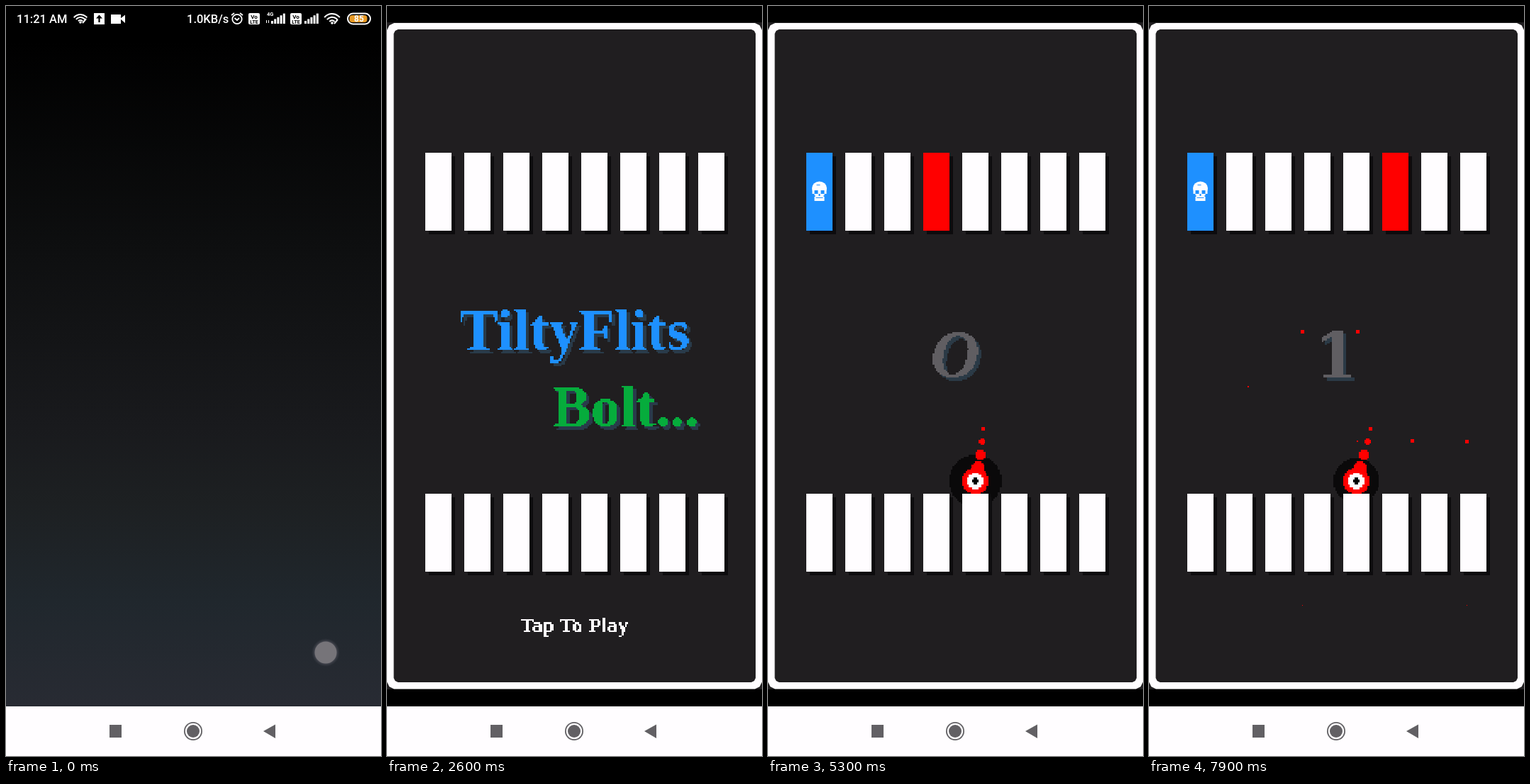
An HTML page with a canvas that plays this animation: 529 by 1058 pixels, repeating every 8 s.

```html
<!DOCTYPE html>
<html lang="en">
<head>
<meta charset="utf-8">
<title>TiltyFlits Bolt</title>
<style>
  html, body { margin: 0; width: 100%; height: 100%; overflow: hidden; background: #000; }
  canvas { display: block; width: 100%; height: 100%; }
</style>
</head>
<body>
<canvas id="stage" width="529" height="1058"></canvas>
<script>
const W = 529, H = 1058, LOOP = 8000, STEP = 100, PX = 2.3;
const RED = '#ff0000', BLUE = '#1e90ff', WHITE = '#fffdff', PANEL = '#201e20';
const ctx = document.getElementById('stage').getContext('2d');
const SERIF = '"Liberation Serif", serif';

function rect(x, y, w, h, color) {
  ctx.fillStyle = color;
  ctx.fillRect(x, y, w, h);
}
function circle(x, y, r, color) {
  ctx.fillStyle = color;
  ctx.beginPath();
  ctx.arc(x, y, r, 0, Math.PI * 2);
  ctx.fill();
}
function poly(points, color) {
  ctx.fillStyle = color;
  ctx.beginPath();
  points.forEach(([x, y]) => ctx.lineTo(x, y));
  ctx.fill();
}
function text(str, x, y, font, color, align = 'left') {
  ctx.font = font;
  ctx.fillStyle = color;
  ctx.textAlign = align;
  ctx.fillText(str, x, y);
}
// Disc built from rows of square pixels
function disc(x, y, r, color) {
  const n = Math.round(r / PX);
  ctx.fillStyle = color;
  for (let row = -n; row < n; row++) {
    const half = Math.round(Math.sqrt(n * n - (row + .5) ** 2)) * PX;
    const top = Math.round(y + row * PX);
    ctx.fillRect(Math.round(x - half), top, Math.round(half * 2), Math.round(y + (row + 1) * PX) - top);
  }
}

// Text rendered on a coarse grid with hard edges
function textLayer(str, x, y, font, color, align) {
  const layer = document.createElement('canvas');
  layer.width = W / PX;
  layer.height = H / PX;
  const c = layer.getContext('2d');
  c.scale(1 / PX, 1 / PX);
  c.font = font;
  c.fillStyle = color;
  c.textAlign = align;
  c.fillText(str, x, y);
  const img = c.getImageData(0, 0, layer.width, layer.height);
  for (let i = 3; i < img.data.length; i += 4) img.data[i] = img.data[i] > 115 ? 255 : 0;
  c.putImageData(img, 0, 0);
  return layer;
}
function pixelText(str, x, y, font, color, align, shadow) {
  const layers = [textLayer(str, x, y, font, color, align)];
  if (shadow) layers.unshift(textLayer(str, x + 4.6, y + 4.6, font, shadow, align));
  return () => {
    ctx.imageSmoothingEnabled = false;
    layers.forEach(l => ctx.drawImage(l, 0, 0, l.width * PX, l.height * PX));
  };
}
const titleTop = pixelText('TiltyFlits', 101, 486, `bold 83px ${SERIF}`, BLUE, 'left', '#293b4a');
const titleEnd = pixelText('Bolt...', 233, 594, `bold 82px ${SERIF}`, '#06ac3c', 'left', '#293b4a');
const prompt = pixelText('Tap To Play', 264, 884, `bold 30px ${SERIF}`, WHITE, 'center');
const scores = [
  pixelText('O', 264, 524, `italic bold 96px ${SERIF}`, '#605e62', 'center', '#2b3a46'),
  pixelText('1', 264, 524, 'bold 88px "DejaVu Serif", serif', '#605e62', 'center', '#2b3a46')
];

function drawNav() {
  const gray = '#626064';
  rect(0, 988, W, 70, WHITE);
  rect(146, 1014, 17, 18, gray);
  circle(264, 1023, 13, gray);
  circle(264, 1023, 11.2, WHITE);
  circle(264, 1023, 9, gray);
  poly([[363, 1023], [380, 1013.5], [380, 1033]], gray);
}

function wifi(x, y, size) {
  ctx.strokeStyle = '#fff';
  ctx.lineWidth = 2;
  for (let i = 1; i <= 3; i++) {
    ctx.beginPath();
    ctx.arc(x, y, size * i / 3, -Math.PI * .78, -Math.PI * .22);
    ctx.stroke();
  }
  circle(x, y - 1, 1.8, '#fff');
  ctx.beginPath();
  ctx.moveTo(x + 3, y);
  ctx.lineTo(x + 8, y - 6);
  ctx.stroke();
}
function volte(x) {
  ctx.fillStyle = '#fff';
  ctx.beginPath();
  ctx.roundRect(x, 10, 16, 16, 2);
  ctx.fill();
  text('Vo', x + 8, 17.5, 'bold 8px Roboto, sans-serif', '#000', 'center');
  text('LTE', x + 8, 24.5, 'bold 7px Roboto, sans-serif', '#000', 'center');
}
function signal(x) {
  for (let i = 0; i < 5; i++) rect(x + i * 4.2, 21 - i * 2.6, 3, 4 + i * 2.6, '#fff');
}
function drawStatus() {
  const font = '500 16.5px Roboto, sans-serif';
  text('11:21 AM', 15, 24, font, '#fff');
  wifi(105, 24, 12);
  rect(124, 10, 15, 16, '#fff');
  poly([[131.5, 12.5], [136, 17.5], [127, 17.5]], '#000');
  rect(130.4, 16, 2.2, 7, '#000');
  rect(148, 12, 14, 13, '#fff');
  poly([[161, 18], [168, 12.5], [168, 24]], '#fff');
  text('1.0KB/s', 255, 24, font, '#fff');
  ctx.strokeStyle = '#fff';
  ctx.lineWidth = 1.8;
  ctx.beginPath();
  ctx.arc(326, 18.5, 6.7, 0, 7);
  ctx.moveTo(322.5, 17);
  ctx.lineTo(326, 20);
  ctx.lineTo(329, 17);
  ctx.moveTo(318, 13);
  ctx.lineTo(322, 10);
  ctx.moveTo(330, 10);
  ctx.lineTo(334, 13);
  ctx.stroke();
  volte(342);
  text('4G', 368, 14, 'bold 7.5px Roboto, sans-serif', '#fff');
  rect(367, 20, 1, 4, '#fff');
  rect(370, 20, 1, 4, '#fff');
  signal(374);
  volte(401);
  signal(421);
  wifi(460, 25, 14);
  ctx.fillStyle = '#e89a25';
  ctx.strokeStyle = '#fff';
  ctx.beginPath();
  ctx.roundRect(482, 10.5, 32, 15, 7.5);
  ctx.stroke();
  ctx.beginPath();
  ctx.roundRect(484.5, 13, 25, 10, 4);
  ctx.fill();
  text('85', 498, 22.3, 'bold 12px Roboto, sans-serif', '#fff', 'center');
}
function drawLaunch(alpha) {
  ctx.globalAlpha = alpha;
  const sky = ctx.createLinearGradient(0, 0, 0, 988);
  [[0, '#000'], [.05, '#000'], [.35, '#0e0f10'], [.6, '#191a1d'], [.71, '#1d2022'], [.85, '#20272d'], [1, '#282b33']]
    .forEach(([at, color]) => sky.addColorStop(at, color));
  rect(0, 0, W, 988, sky);
  drawStatus();
  const glow = ctx.createRadialGradient(451, 912, 14, 451, 912, 20);
  glow.addColorStop(0, '#55565f');
  glow.addColorStop(1, 'rgba(60,62,72,0)');
  circle(451, 912, 20, glow);
  circle(451, 912, 15.5, '#767479');
  ctx.globalAlpha = 1;
}

function drawPanel() {
  rect(0, 23, W, 941, PANEL);
  const cut = (l, t, r, b, n) => [
    [l + n, t], [r - n, t], [r - n / 3, t + n / 3], [r, t + n], [r, b - n], [r - n / 3, b - n / 3],
    [r - n, b], [l + n, b], [l + n / 3, b - n / 3], [l, b - n], [l, t + n], [l + n / 3, t + n / 3]
  ];
  poly(cut(0, 24, W, 963.5, 10), WHITE);
  poly(cut(9.5, 33, 520, 954, 6), PANEL);
}

const columnX = col => 72 + (col - 1) * 55.1;
const rowY = { top: 207, bottom: 688 };

function drawSkull(x, y) {
  ctx.fillStyle = WHITE;
  ctx.beginPath();
  ctx.ellipse(x, y - 4, 10.5, 9.5, 0, 0, 7);
  ctx.fill();
  rect(x - 10, y - 3, 20, 7, WHITE);
  rect(x - 7, y + 2, 14, 12, WHITE);
  rect(x - 7, y - 1, 5, 5, BLUE);
  rect(x + 2, y - 1, 5, 5, BLUE);
  rect(x - 1, y + 4, 2, 3, BLUE);
  rect(x - 5, y + 9, 10, 1, BLUE);
  rect(x - 4, y - 9, 5, 1, BLUE);
  rect(x - 8, y + 6, 2, 2, BLUE);
  rect(x + 6, y + 6, 2, 2, BLUE);
}
function drawTiles(special) {
  for (const row in rowY) {
    const y = rowY[row];
    for (let col = 1; col <= 8; col++) {
      const x = Math.round(columnX(col) - 18.5);
      rect(x + 5, y + 5, 37, 110, '#0c0b0d');
      const kind = special[row + col];
      rect(x, y, 37, 110, kind === 'red' ? RED : kind ? BLUE : WHITE);
      if (kind === 'skull') drawSkull(x + 18.5, y + 54);
    }
  }
}
function tilesAt(t) {
  const special = { top1: 'skull' };
  if (t >= 7900) special.top6 = 'red';
  else if (t >= 6200) special.bottom5 = 'red', special.bottom8 = 'skull';
  else if (t >= 5300) special.top4 = 'red';
  return special;
}

// Each hit: [time, column, sideways bend]; hits alternate bottom, top
const START = 4100, CROSSING = 300;
const hits = [
  [START, 5, 0], [4400, 8, 0], [4700, 4, 0], [5000, 4, 0], [5300, 5, 135], [5600, 4, 0], [5900, 3, 0],
  [6200, 3, 0], [6550, 4, 0], [6900, 2, 0], [7250, 4, 0], [7600, 6, 0], [7900, 5, 47]
];
const endY = i => i % 2 ? 338 : 670;

function ballAt(t) {
  let i = hits.findIndex(hit => hit[0] >= t);
  if (i < 0) i = hits.length - 1;
  const [time, col, bend] = hits[i];
  if (!i) return [columnX(col), endY(0)];
  const s = Math.min(1, Math.max(0, 1 - (time - t) / CROSSING));
  const from = columnX(hits[i - 1][1]);
  return [
    from + (columnX(col) - from) * s + bend * s * (1 - s),
    endY(i - 1) + (endY(i) - endY(i - 1)) * s
  ];
}
function drawBall(t) {
  [2, 4, 6, 9].forEach((r, i) => disc(...ballAt(t - (4 - i) * 1000 / 60), r, RED));
  const [x, y] = ballAt(t);
  disc(x, y, 18.4, RED);
  disc(x, y, 11.5, WHITE);
  disc(x, y, 5.5, '#000');
}

// Shards: [x speed, y speed, life in ms]
const spray = [
  [-2.5, 4.5, 480], [-1.5, .5, 480], [-1.5, 2.5, 480], [-.5, -2.5, 430],
  [.5, -1.5, 480], [.5, 1.5, 450], [-.5, 2.5, 480], [.5, 2.5, 420]
];
const shower = [
  [-2.5, 3.5, 330], [-1.5, 2.5, 480], [-.5, 2.5, 480], [-.5, 4.5, 315],
  [.5, 4.5, 560], [1.5, 4.5, 500], [-1.5, 7.5, 310], [1.5, 7.5, 310]
];
const bursts = [
  { time: 6146, x: 180, y: 269, shards: spray, flip: 1 },
  { time: 6900, x: 127, y: 269, shards: spray, flip: -1 },
  { time: 7620, x: 332.5, y: 266, shards: shower, flip: 1 }
];
function drawBursts(t) {
  const speed = 4.6 * 60 / 1000;
  for (const { time, x, y, shards, flip } of bursts) {
    const age = t - time;
    if (age < 0) continue;
    for (const [vx, vy, life] of shards) {
      const size = 10 * (1 - age / life);
      if (size <= 0) continue;
      const px = x + vx * flip * speed * age, py = y + vy * speed * age;
      if (px < 12 || px > 517 || py < 36 || py > 950) continue;
      rect(Math.round(px - size / 2), Math.round(py - size / 2), Math.ceil(size), Math.ceil(size), RED);
    }
  }
}

function drawTitle(t) {
  drawTiles({});
  titleTop();
  titleEnd();
  if (!(t >= 1900 && t < 2600) && !(t >= 3200 && t < 3900)) prompt();
}
function drawGame(t) {
  scores[t >= 7900 ? 1 : 0]();
  const playing = t >= START;
  if (playing) disc(...ballAt(t), 34 + 3 * Math.cos((t - 5300) * .0161), '#0a090a');
  drawBursts(t);
  drawTiles(tilesAt(t));
  if (playing) drawBall(t);
}

function frame() {
  const t = Math.floor(performance.now() % LOOP / STEP) * STEP;
  rect(0, 0, W, H, '#000');
  if (t < 400) drawLaunch(1 - t / 400);
  if (t >= 1300) {
    drawPanel();
    if (t < 4000) drawTitle(t);
    else drawGame(t);
  }
  drawNav();
  requestAnimationFrame(frame);
}
frame();
</script>
</body>
</html>
```
